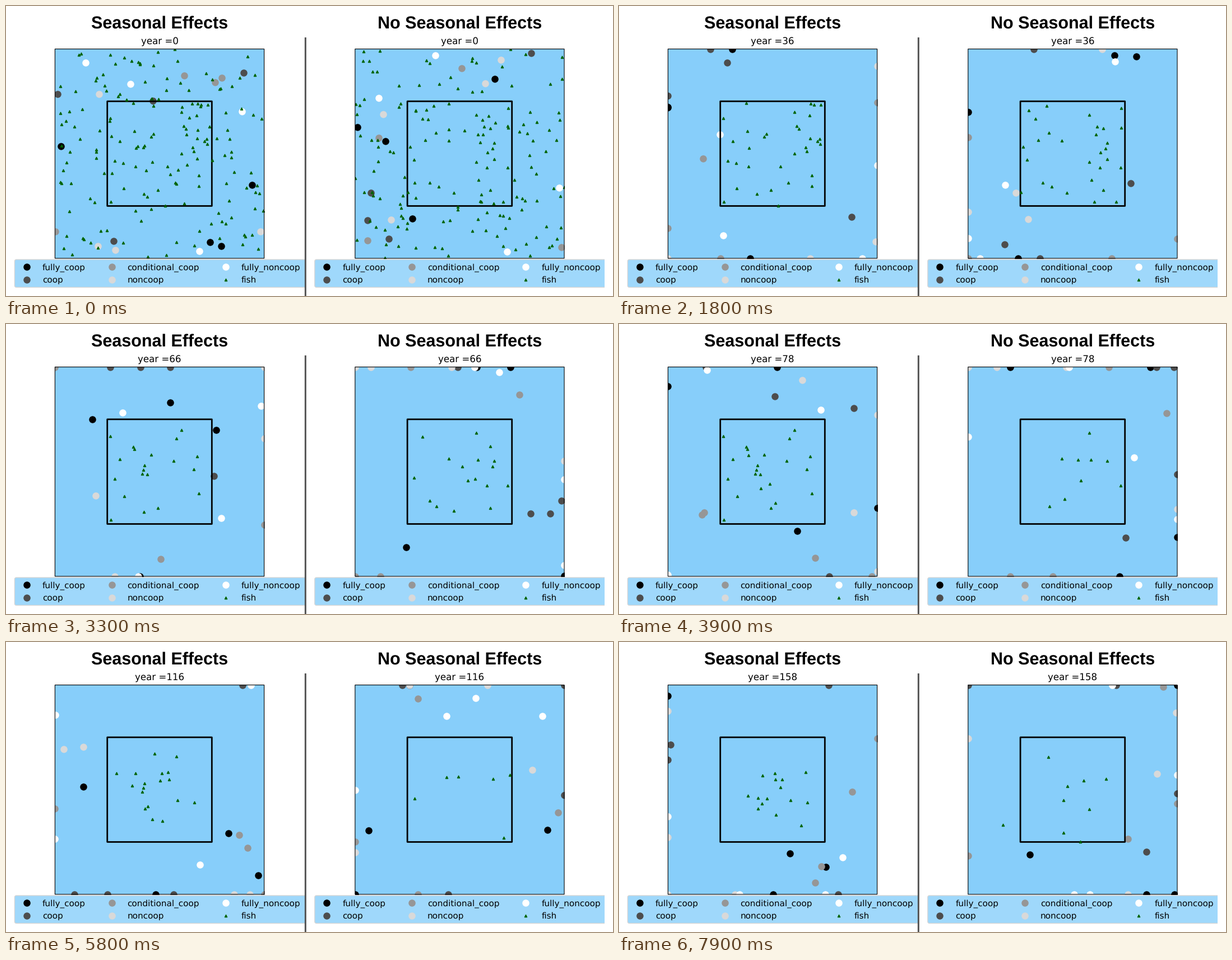
A matplotlib script for the animation above (8000 ms loop, 1083x517 px).

```python
import math
import random

import matplotlib.pyplot as plt
from matplotlib.animation import FuncAnimation
from matplotlib.patches import FancyBboxPatch, Rectangle

W, H, DPI = 1083, 517, 100
FRAMES, INTERVAL = 80, 100
YEARS_PER_FRAME = 2

SEA, CARD, DIVIDER = "#87CEFA", "#9FD8FB", "#505050"
LEFT, TOP, SIDE = 87.4, 76.6, 373.2   # left sea square
PANEL_GAP = 535.4
STRIDE = 115                          # boat move per frame
CREW = 4                              # boats per strategy

STRATEGIES = {
    "fully_coop": "black",
    "coop": "#4d4d4d",
    "conditional_coop": "#969696",
    "noncoop": "#d9d9d9",
    "fully_noncoop": "white",
}

plt.rcParams["text.hinting"] = "none"
fig = plt.figure(figsize=(W / DPI, H / DPI), dpi=DPI, facecolor="white")
ax = fig.add_axes([0, 0, 1, 1])
ax.set_xlim(0, W)
ax.set_ylim(H, 0)
ax.axis("off")


def clamp(v, low):
    return min(max(v, low), low + SIDE)


def label(x, y, text, size, family="DejaVu Sans", **kw):
    return ax.text(x, y, text, size=size, family=family, va="baseline", **kw)


def frame(x, y, side, lw, z):
    ax.add_patch(Rectangle((x, y), side, side, fill=False, ec="black", lw=lw,
                           joinstyle="round", snap=False, zorder=z))


def boat_marks(color, x=(), y=(), z=2):
    return ax.scatter(x, y, s=64, c=color, marker="o", lw=1,
                      edgecolors=color, zorder=z)


def fish_marks(x=(), y=(), z=5):
    return ax.scatter(x, y, s=9, c="darkgreen", marker="^", lw=1,
                      edgecolors="darkgreen", zorder=z)


class Panel:
    def __init__(self, x, heading, residents, births, spread, seed):
        self.x = x
        self.box = (x + SIDE / 4, TOP + SIDE / 4)
        self.rng = random.Random(seed)
        self.boats = self.sail()
        self.fish = self.early_fish(residents) + self.late_fish(births, spread)
        self.draw_scene(heading)

    def protected(self, x, y):
        bx, by = self.box
        return bx < x < bx + SIDE / 2 and by < y < by + SIDE / 2

    def spot(self, inside):
        while True:
            x = self.x + self.rng.uniform(0, SIDE)
            y = TOP + self.rng.uniform(0, SIDE)
            if self.protected(x, y) == inside:
                return x, y

    def move(self, x, y):
        """Random heading, stopped by the shore and kept out of the box."""
        while True:
            a = self.rng.uniform(0, 2 * math.pi)
            nx = clamp(x + STRIDE * math.cos(a), self.x)
            ny = clamp(y + STRIDE * math.sin(a), TOP)
            if not self.protected(nx, ny):
                return nx, ny

    def sail(self):
        log = [[self.spot(False) for _ in range(CREW * len(STRATEGIES))]]
        while len(log) < FRAMES:
            log.append([self.move(x, y) for x, y in log[-1]])
        return log

    def early_fish(self, residents):
        """First stock as (x, y, birth, death); open water is soon emptied."""
        stock = [(*self.spot(True), 0, self.rng.uniform(0, 45))
                 for _ in range(residents)]
        for _ in range(110):
            life = min(self.rng.expovariate(1 / 5), 17)
            stock.append((*self.spot(False), 0, life))
        return stock

    def late_fish(self, births, spread):
        """Young fish, born at a steady rate around the middle of the box."""
        stock = []
        cx, cy = self.x + SIDE / 2 - 10, TOP + SIDE / 2 + 5
        for i in range(births):
            x = clamp(self.rng.gauss(cx, spread), self.x)
            y = clamp(self.rng.gauss(cy, spread), TOP)
            birth = 20 + (FRAMES - 20) * i / births
            stock.append((x, y, birth, birth + self.rng.uniform(10, 40)))
        return stock

    def draw_scene(self, heading):
        mid = self.x + SIDE / 2
        label(mid, 40, heading, 22, "Liberation Sans", ha="center",
              weight="bold")
        self.year = label(mid, 68.5, "", 12, ha="center")
        sea = Rectangle((self.x, TOP), SIDE, SIDE, fc=SEA, ec="none",
                        snap=False, zorder=1)
        ax.add_patch(sea)
        frame(self.x, TOP, SIDE, 0.8, 6)
        frame(*self.box, SIDE / 2, 2, 4)
        self.marks = [boat_marks(c) for c in STRATEGIES.values()]
        self.shoal = fish_marks()
        for mark in self.marks + [self.shoal]:
            mark.set_clip_path(sea)
        self.draw_legend()

    def draw_legend(self):
        left = self.x - 72
        window = Rectangle((left - 2, 450), 519.3, 60, fc="none", ec="none")
        ax.add_patch(window)
        card = FancyBboxPatch((left + 3, 455), 520, 43.5, fc=CARD,
                              ec="#d6d6d6", lw=1, zorder=7, snap=False,
                              boxstyle="round,pad=3,rounding_size=3")
        ax.add_patch(card)
        card.set_clip_path(window)
        for i, name in enumerate([*STRATEGIES, "fish"]):
            x = left + (21.6, 173.3, 376.6)[i // 2]
            y = 464.8 + 22.8 * (i % 2)
            if name == "fish":
                fish_marks([x], [y], 8)
            else:
                boat_marks(STRATEGIES[name], [x], [y], 8)
            label(x + 27.8, y + 5.2, name, 11, zorder=8)

    def show(self, n):
        self.year.set_text(f"year ={YEARS_PER_FRAME * n}")
        for i, mark in enumerate(self.marks):
            mark.set_offsets(self.boats[n][CREW * i:CREW * (i + 1)])
        self.shoal.set_offsets([(x, y) for x, y, birth, death in self.fish
                                if birth <= n <= death])
        return [self.year, self.shoal, *self.marks]


panels = [
    Panel(LEFT, "Seasonal Effects", residents=56, births=36, spread=34,
          seed=5),
    Panel(LEFT + PANEL_GAP, "No Seasonal Effects", residents=46, births=22,
          spread=46, seed=12),
]
ax.plot([534.3, 534.3], [56, H], color=DIVIDER, lw=2.1, zorder=9,
        solid_capstyle="butt", snap=False)


def update(n):
    return [artist for p in panels for artist in p.show(n)]


anim = FuncAnimation(fig, update, frames=FRAMES, interval=INTERVAL,
                     init_func=lambda: update(0), repeat=True, repeat_delay=0)
plt.show()
```
